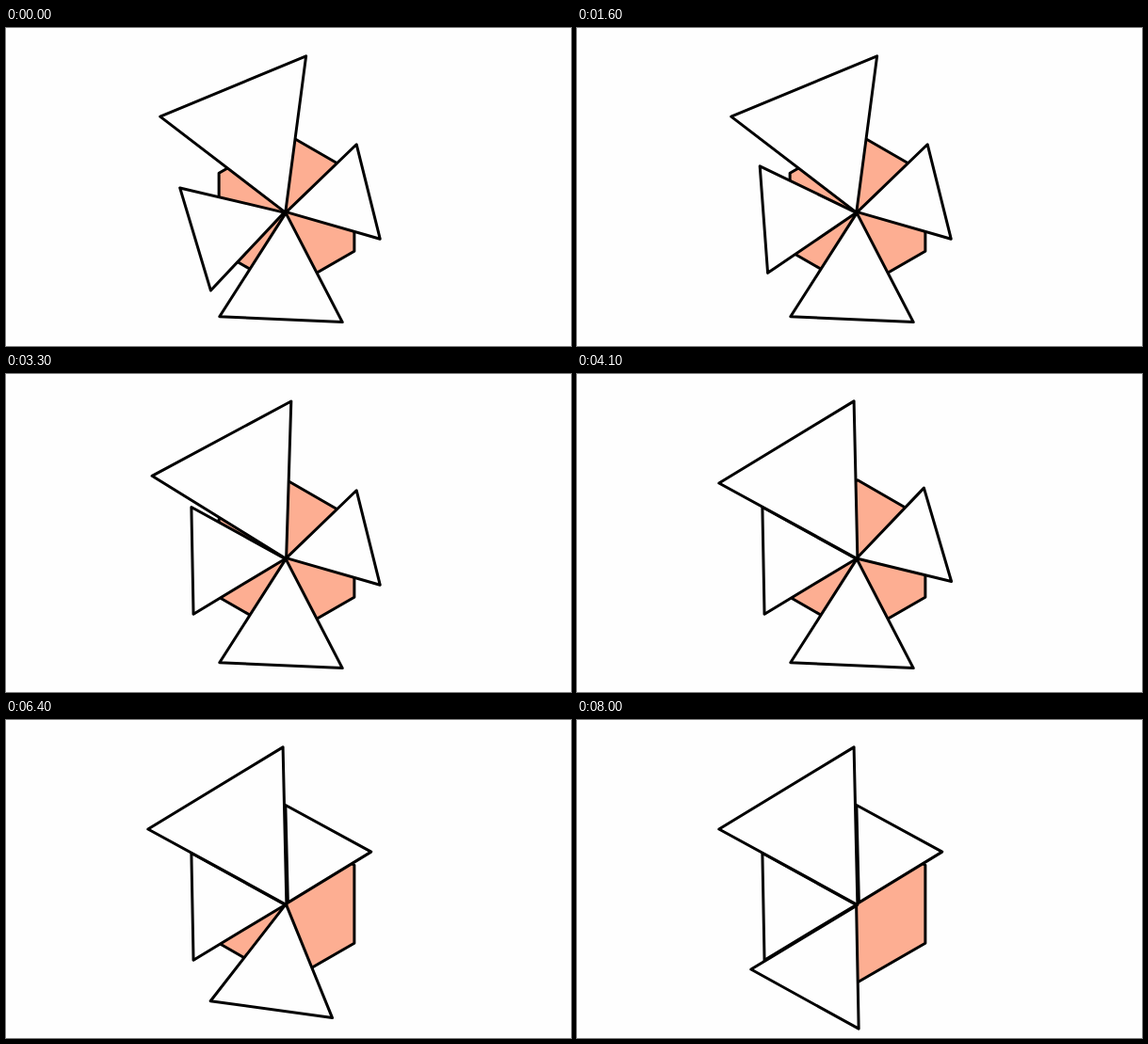
An HTML page that plays this animation: 600x338 px, repeating every 8.1 s.

```html
<!DOCTYPE html>
<html lang="en">
<head>
<meta charset="utf-8">
<title>Turning triangles</title>
<style>
  html, body { margin: 0; width: 100%; height: 100%; overflow: hidden; background: #fefefe; }
  svg { display: block; width: 100%; height: 100%; }
  polygon { fill: #fefefe; stroke: #000; stroke-width: 3; stroke-linejoin: round; }
  #hexagon { fill: #fdae92; }
</style>
</head>
<body>
<svg id="stage" viewBox="0 0 600 338"></svg>
<script>
const LOOP = 8100, TURN = 2000, STEP = 100;

// Each pose is [centre x, centre y, direction of the first corner in degrees].
// The triangles turn one after another, in this order.
const triangles = [
  { radius: 65.7, from: [232.5, 215, -16.7], to: [230.8, 197.7, -1.1] },
  { radius: 96.8, from: [259.7, 106.7, 67.5], to: [247.6, 113.8, 58.7] },
  { radius: 59.8, from: [355.7, 181.2, 166], to: [328, 141.6, 118.6] },
  { radius: 75.4, from: [293.7, 272, -87.4], to: [260.2, 263.6, -61.1] }
];

const stage = document.getElementById('stage');

function addPolygon() {
  const shape = document.createElementNS('http://www.w3.org/2000/svg', 'polygon');
  return stage.appendChild(shape);
}

function corners(count, radius, [x, y, angle]) {
  return Array.from({ length: count }, (_, i) => {
    const a = (angle + i * 360 / count) * Math.PI / 180;
    return [x + radius * Math.cos(a), y + radius * Math.sin(a)];
  }).join(' ');
}

const hexagon = addPolygon();
hexagon.id = 'hexagon';
hexagon.setAttribute('points', corners(6, 83, [298, 195.7, 90]));
for (const t of triangles) t.shape = addPolygon();

function draw(now) {
  const time = Math.floor(now % LOOP / STEP) * STEP;
  triangles.forEach(({ radius, from, to, shape }, i) => {
    const p = Math.min(1, Math.max(0, time / TURN - i));
    const pose = from.map((v, k) => v + (to[k] - v) * p);
    shape.setAttribute('points', corners(3, radius, pose));
  });
}

let start;
function tick(now) {
  start ??= now;
  draw(now - start);
  requestAnimationFrame(tick);
}
draw(0);
requestAnimationFrame(tick);
</script>
</body>
</html>
```
